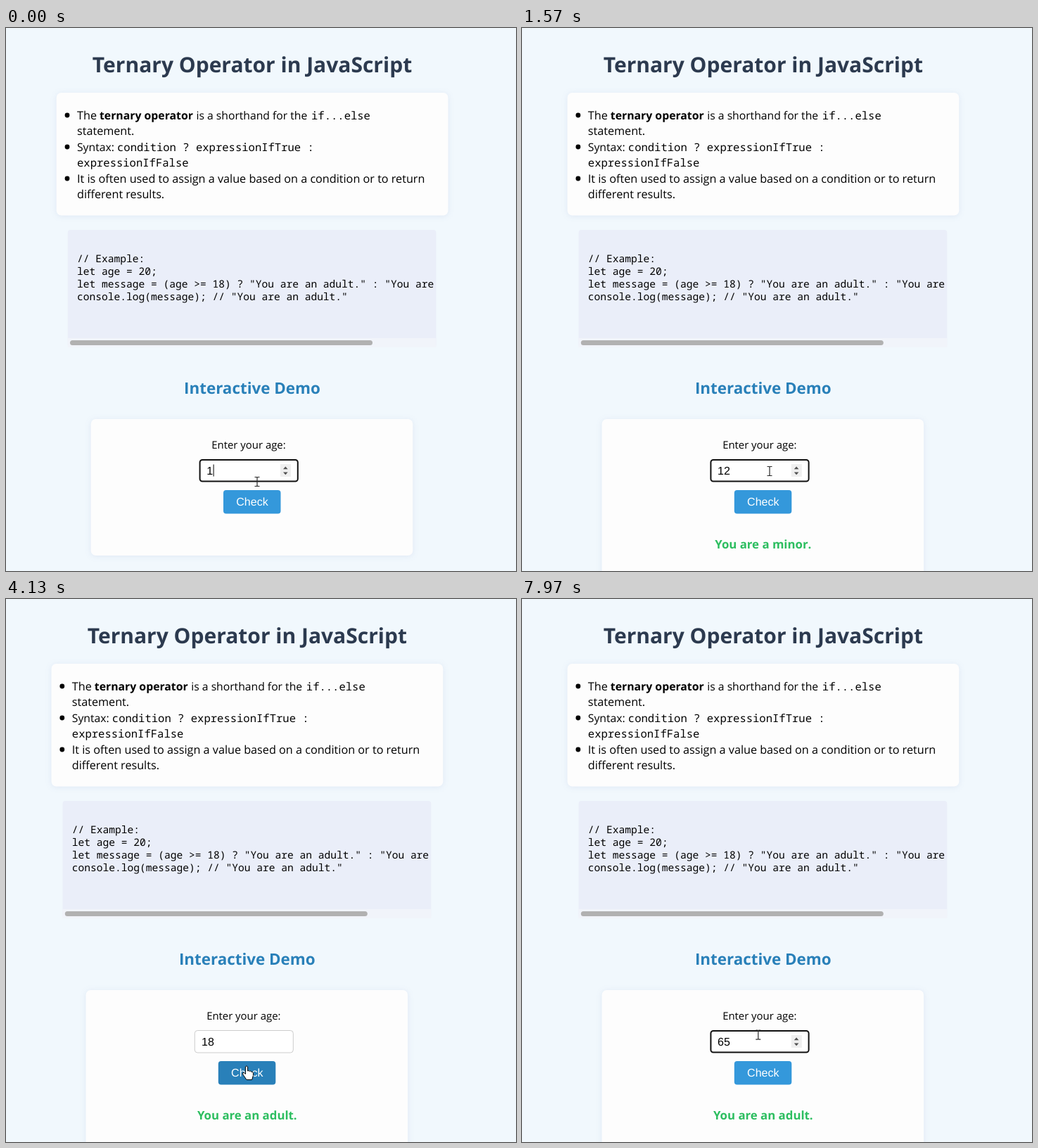
Recreate the animation shown at these times as an HTML page. Size 725x772 px, loop 8 s.

```html
<!DOCTYPE html>
<html lang="en">
<head>
<meta charset="utf-8">
<title>Ternary Operator in JavaScript</title>
<style>
  html, body { margin: 0; width: 100%; height: 100%; overflow: hidden; background: #f1f8fd; }
  svg { display: block; width: 100vw; height: 100vh; }
  text { font-family: "Open Sans", "Noto Sans", sans-serif; white-space: pre; text-rendering: geometricPrecision; }
  .mid { text-anchor: middle; }
  .bold { font-weight: 700; }
  .list text { font-size: 16.2px; }
  .list .bold { font-size: 15.8px; }
  .list .tight { font-size: 15.7px; }
  .list .code { font-size: 15.55px; }
  .code { font-family: "Noto Sans Mono", "DejaVu Sans Mono", monospace; font-size: 14.58px; }
  .ui { font-family: "Liberation Sans", Arial, sans-serif; font-size: 16px; }
  .card { fill: #fdfdfd; filter: drop-shadow(0 1px 4px rgba(70, 90, 170, .1)); }
</style>
</head>
<body>
<svg viewBox="0 0 725 772" xmlns="http://www.w3.org/2000/svg">
  <defs>
    <clipPath id="codeClip"><rect x="88" y="287" width="523.5" height="167"/></clipPath>
  </defs>
  <rect width="725" height="772" fill="#f1f8fd"/>

  <g id="page">
    <text class="mid bold" x="350" y="63" font-size="30" fill="#2c3a4f">Ternary Operator in JavaScript</text>

    <rect class="card" x="71.7" y="92" width="556.8" height="174.5" rx="7"/>
    <g class="list" id="list"></g>

    <rect x="87.7" y="287" width="523.8" height="167" rx="4" fill="#eaeef9"/>
    <rect x="87.7" y="441" width="523.8" height="13" fill="#f1f4fa"/>
    <rect x="91" y="444" width="430" height="7" rx="3.5" fill="#b1b1b1"/>
    <g id="code" clip-path="url(#codeClip)"></g>

    <text class="mid bold" x="350" y="520" font-size="22.4" fill="#2980b9">Interactive Demo</text>

    <rect class="card" id="demo" x="120.7" y="556" width="457.6" rx="7"/>
    <text class="mid" x="345" y="597.5" font-size="14.9">Enter your age:</text>
    <rect id="field" fill="#fff"/>
    <text class="ui" id="age" x="285.3" y="634.7"></text>
    <rect id="caret" y="620.5" width="1" height="17"/>
    <g id="spin">
      <rect x="390" y="620" width="15" height="18" fill="#efefef"/>
      <path d="M394 627.2l3.3-3.6 3.3 3.6zM394 631.6l3.3 3.6 3.3-3.6z" fill="#505050"/>
    </g>
    <rect id="button" x="309" y="657" width="81.5" height="33.5" rx="4"/>
    <text class="mid ui" x="350" y="679.2" fill="#fff">Check</text>
    <text class="mid bold" id="result" x="350" y="739.5" font-size="16.8" fill="#2dbe60"></text>
  </g>

  <g id="mouse">
    <path id="beam" d="M-3.5-6.5h2.5q1 0 1 1q0-1 1-1h2.5M0-5.5V5.5M-3.5 6.5h2.5q1 0 1-1q0 1 1 1h2.5" fill="none" stroke="#2a2a2a" stroke-width="1.2"/>
    <path id="arrow" d="M0 0V16l3.7-3.5 2.4 5.6 2.2-1-2.4-5.4H11z" fill="#fff" stroke="#000"/>
    <path id="hand" d="M-1.6 1Q0-1.2 1.6 1V7Q3.2 5.8 4.2 7.4Q5.8 6.4 6.8 8.2Q9.2 7.6 9.4 10V13.5L7.6 19.5H0L-5.2 12Q-6.2 9-3.8 9.2L-1.6 11.4z" fill="#fff" stroke="#000" stroke-linejoin="round"/>
  </g>
</svg>
<script>
const LOOP = 8000, BLINK = 530;
const $ = id => document.getElementById(id);
const set = (el, attrs) => { for (const k in attrs) el.setAttribute(k, attrs[k]); };
const show = (el, on) => set(el, { visibility: on ? "visible" : "hidden" });

function add(parent, tag, attrs, text) {
  const el = document.createElementNS("http://www.w3.org/2000/svg", tag);
  set(el, attrs);
  if (text) el.textContent = text;
  $(parent).append(el);
}

// Explanation list: line number, x, text, class
[
  [0, 101, "The"],
  [0, 133, "ternary operator", "bold"],
  [0, 270.5, "is a shorthand for the", "tight"],
  [0, 434, "if...else", "code"],
  [1, 101, "statement."],
  [2, 101, "Syntax:", "tight"],
  [2, 158, "condition ? expressionIfTrue :", "code"],
  [3, 101, "expressionIfFalse", "code"],
  [4, 101, "It is often used to assign a value based on a condition or to return"],
  [5, 101, "different results."]
].forEach(([line, x, text, cls = ""]) =>
  add("list", "text", { x, y: 129.5 + 22.5 * line, class: cls }, text));
[124, 169, 214].forEach(cy => add("list", "circle", { cx: 87, cy, r: 3.4 }));

[
  "// Example:",
  "let age = 20;",
  'let message = (age >= 18) ? "You are an adult." : "You are a minor.";',
  'console.log(message); // "You are an adult."'
].forEach((text, i) =>
  add("code", "text", { x: 101, y: 332.8 + 18.15 * i, class: "code" }, text));

// Each track lists [time, value...]
const ages = [[0, "1"], [130, "12"], [2300, "1"], [2950, "18"], [5700, "1"], [5850, ""], [6100, "6"], [6300, "65"]];
const results = [[0, ""], [530, "You are a minor."], [4020, "You are an adult."]];
const focus = [[0, true], [430, false], [1000, true], [3920, false], [4450, true]];
const path = [
  [0, 357, 645], [100, 357, 645], [380, 350, 662], [650, 350, 662], [950, 352, 630],
  [2100, 352, 630], [2900, 339, 632], [3450, 339, 632], [3800, 342, 664], [4150, 342, 664],
  [4430, 317, 625], [5400, 317, 625], [6000, 318, 626], [7550, 318, 626], [8000, 336, 619.5]
];

const latest = (track, t) => track.findLast(step => step[0] <= t);

function mouseAt(t) {
  const i = Math.max(1, path.findIndex(p => p[0] > t));
  const [t0, x0, y0] = path[i - 1], [t1, x1, y1] = path[i];
  const u = (t - t0) / (t1 - t0), e = u * u * (3 - 2 * u);
  return [x0 + (x1 - x0) * e, y0 + (y1 - y0) * e];
}

function draw(t) {
  const [typed, age] = latest(ages, t);
  const [focused, hasFocus] = latest(focus, t);
  const result = latest(results, t)[1];
  const [mx, my] = mouseAt(t);
  const overButton = my >= 657, overField = my <= 646;

  // The page scrollbar appears with the first result and shifts the layout
  set($("page"), { transform: `translate(${result ? -7.2 : 0} 0)` });
  set($("demo"), { height: result ? 240 : 194 });
  $("result").textContent = result;

  set($("field"), hasFocus
    ? { x: 275.6, y: 614, width: 139.2, height: 30.5, rx: 3.5, stroke: "#101010", "stroke-width": 2 }
    : { x: 275.5, y: 613.5, width: 140, height: 31.5, rx: 4, stroke: "#ccc", "stroke-width": 1 });
  $("age").textContent = age;
  set($("caret"), { x: 285.7 + 8.9 * age.length });
  show($("caret"), hasFocus && (t - Math.max(typed, focused)) % (2 * BLINK) < BLINK);
  show($("spin"), hasFocus || overField);
  set($("button"), { fill: overButton ? "#2980b9" : "#3498db" });

  set($("mouse"), { transform: `translate(${mx} ${my})` });
  show($("beam"), overField);
  show($("hand"), overButton);
  show($("arrow"), !overField && !overButton);
}

function frame() {
  draw(performance.now() % LOOP);
  requestAnimationFrame(frame);
}
frame();
</script>
</body>
</html>
```
